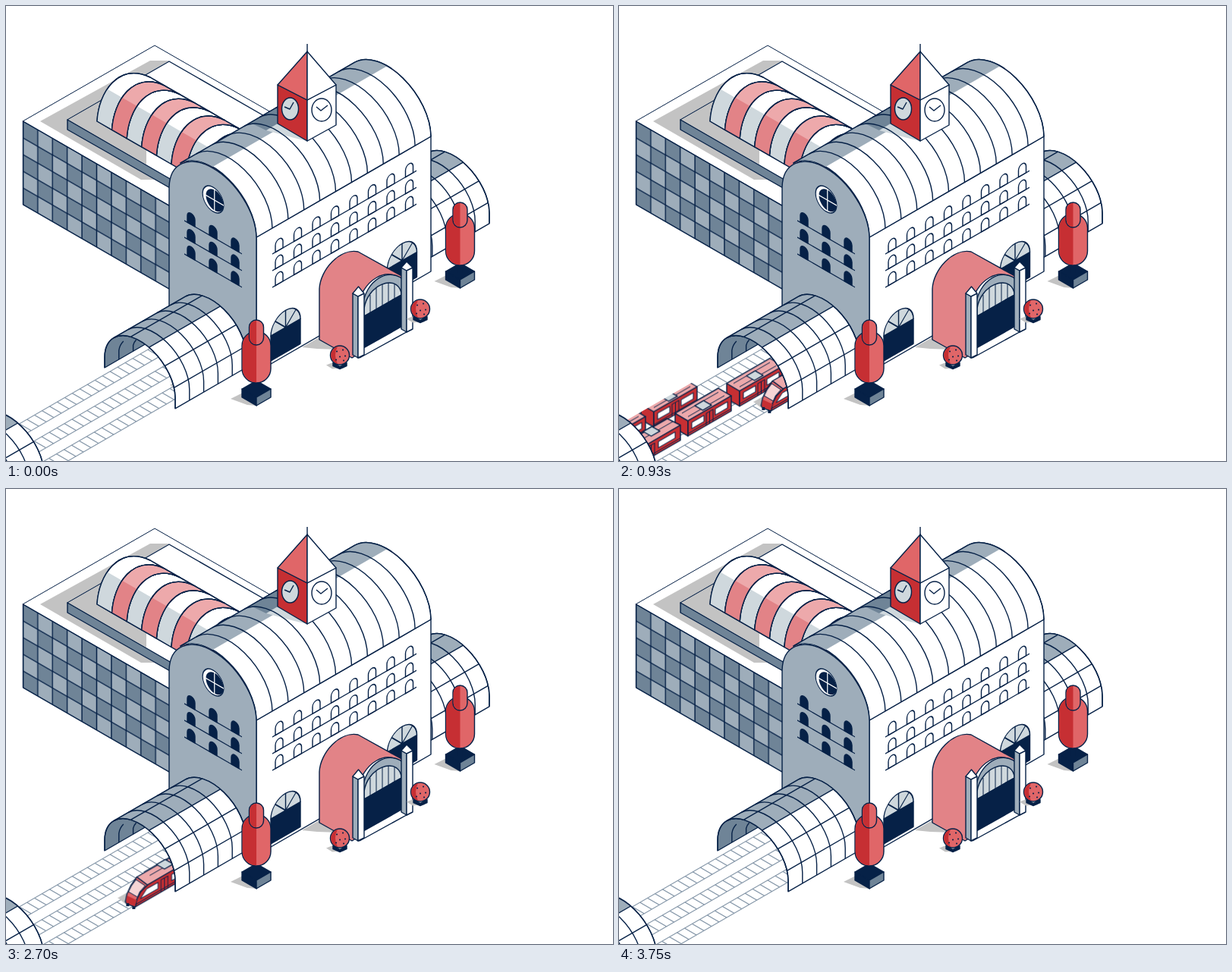
Animation, 800 px wide and 600 px high, one loop 4530 ms. Source, as an HTML page without scripts:

```html
<!DOCTYPE html>
<html lang="en">
<head>
<meta charset="utf-8">
<title>Railway station</title>
<style>
html, body { margin: 0; width: 100%; height: 100%; overflow: hidden; background: #fff; }
svg { display: block; width: 800px; height: 600px; stroke: #062147; stroke-width: 1.4; stroke-linejoin: round; fill: none; }
.flat { stroke: none; }
.white { fill: #fff; }
.ink { fill: #062147; }
.slate { fill: #6f8497; }
.steel { fill: #9eadba; }
.mist { fill: #cfd8dd; }
.shade { fill: #c3c3c3; stroke: none; }
.red { fill: #c62f33; }
.coral { fill: #e06668; }
.rose { fill: #e28387; }
.pink { fill: #eda9ab; }
.blush { fill: #f6d5d5; }
.thin { stroke-width: 1; }
.track { stroke: #8496a8; stroke-width: 1.3; }
.train { animation: 4530ms infinite; }
#express { animation-name: express; }
#local { animation-name: local; }
#shuttle { animation-name: shuttle; }

/* nose position along the track, one step per 30 ms */
@keyframes express {
  0% { transform: translateX(207px); animation-timing-function: steps(55); }
  36.424%, 100% { transform: translateX(-377px); }
}
@keyframes local {
  0% { transform: translateX(222px); animation-timing-function: steps(55); }
  36.424%, 100% { transform: translateX(-188px); }
}
@keyframes shuttle {
  0% { transform: translateX(226px); animation-timing-function: steps(16); }
  10.596% { transform: translateX(207px); animation-timing-function: steps(8); }
  15.894% { transform: translateX(198px); animation-timing-function: steps(15); }
  25.828% { transform: translateX(175px); animation-timing-function: steps(15); }
  35.762%, 58.94% { transform: translateX(166px); animation-timing-function: steps(9); }
  64.901% { transform: translateX(88px); animation-timing-function: steps(27); }
  82.781%, 100% { transform: translateX(-185px); }
}
</style>
</head>
<body>
<svg viewBox="0 0 800 600">
<defs>
  <pattern id="checks" width="38.8" height="44" patternUnits="userSpaceOnUse">
    <path class="steel flat" d="M0 0H38.8V44H0z"/>
    <path class="slate flat" d="M0 0H19.4V22H0zM19.4 22H38.8V44H19.4z"/>
    <path d="M0 0V44M19.4 0V44M38.8 0V44M0 0H38.8M0 22H38.8M0 44H38.8"/>
  </pattern>
  <clipPath id="yard"><path d="M0 552L130 477V430H223V600H0z"/></clipPath>

  <g id="stripe">
    <path d="M0 0C2-38 28-78 70-58l19.6 11.3C47.6-66.7 21.6-26.7 19.6 11.3z"/>
    <path class="flat" fill="currentColor" d="M0 0C.8-15.2 5.4-30.7 13.4-42.6l19.6 11.3C25-19.4 20.4-3.9 19.6 11.3z"/>
    <path fill="none" d="M0 0C2-38 28-78 70-58l19.6 11.3C47.6-66.7 21.6-26.7 19.6 11.3z"/>
  </g>

  <path id="rib" d="M229.8 207.2A77.7 44.4 55 0 1 330 305"/>
  <path id="hoop" d="M-34.5-52.4A62.8 35.9 55 0 1 46.5 26.8v14"/>
  <g id="tunnel">
    <path class="white" d="M-34.5-52.4L59.5-106.7A62.8 35.9 55 0 1 140.5-27.5V-13.5L46.5 40.8V26.8A62.8 35.9 55 0 0-34.5-52.4z"/>
    <path class="steel flat" d="M-34.5-52.4L59.5-106.7A62.8 35.9 55 0 1 106-94.2L12-39.9A62.8 35.9 55 0 0-34.5-52.4z"/>
    <path d="M44.9 13.3l94-54.3M32.9-15.3l94-54.3M12-39.9l94-54.3M-12-53.8l94-54.3M-34.5-52.4l94-54.3"/>
    <use href="#hoop"/>
    <use href="#hoop" x="18.8" y="-10.85"/>
    <use href="#hoop" x="37.6" y="-21.7"/>
    <use href="#hoop" x="56.4" y="-32.6"/>
    <use href="#hoop" x="75.2" y="-43.4"/>
    <use href="#hoop" x="94" y="-54.3"/>
  </g>

  <path id="pane" d="M0 0V-9a5 5.8 0 0 1 10 0V0z"/>
  <g id="panes2"><use href="#pane"/><use href="#pane" x="24.5"/></g>
  <g id="panes4"><use href="#panes2"/><use href="#panes2" x="49"/></g>
  <g id="sideRow"><path d="M0 0H190"/><use href="#panes4" x="4"/><use href="#panes4" x="102"/></g>
  <g id="gableRow"><path d="M0 0H76"/><g class="ink"><use href="#pane" x="4"/><use href="#pane" x="33"/><use href="#pane" x="62"/></g></g>

  <g id="door">
    <path class="ink" d="M0 0V-33H39V0z"/>
    <path class="mist" d="M0-33a19.5 22.5 0 0 1 39 0z"/>
    <path d="M19.5-33V-55.5M19.5-33L5.7-48.9M19.5-33L33.3-48.9"/>
  </g>

  <g id="tree">
    <path class="shade" d="M296 518L318 507 330 527 318 526z"/>
    <path class="ink" d="M311 505l19-11 19 11-19 11z"/>
    <path class="ink" d="M311 505v11l19 11v-11z"/>
    <path class="slate" d="M349 505v11l-19 11v-11z"/>
    <path d="M330 490v18" stroke-width="6"/>
    <rect class="coral" x="311" y="429" width="38" height="68" rx="19"/>
    <path class="red flat" d="M330 429.7a18.3 18.3 0 0 0-18.3 18.3v30a18.3 18.3 0 0 0 18.3 18.3z"/>
    <rect class="coral" x="320.5" y="414" width="19" height="33" rx="9.5"/>
    <path class="red flat" d="M330 414.7a8.8 8.8 0 0 0-8.8 8.8v14a8.8 8.8 0 0 0 8.8 8.8z"/>
  </g>

  <g id="bush">
    <path class="shade" d="M-18 13L-8 9 6 17-10 18z"/>
    <path class="ink" d="M-9 10L0 15 9 10V14L0 18-9 14z"/>
    <circle class="coral" r="12.5"/>
    <path class="red flat" d="M-3-11.4A11.8 11.8 0 0 0-3 11.4Q-9 0-3-11.4z"/>
    <path d="M-4-5h.1M4-7h.1M7 1h.1M0 2h.1M5 7h.1M-5 6h.1" stroke-width="2" stroke-linecap="round"/>
  </g>

  <g id="pantograph">
    <path d="M-8-30L40-57.7M0-25.5L48-53.2" class="thin"/>
    <path class="mist" d="M9-40l11.5-6.6 10.5 6-11.5 6.6z"/>
  </g>
  <g id="car">
    <path class="red" d="M0 0V-20L-17-30V-10z"/>
    <path class="pink" d="M0-20L-17-30 40-63 57-53z"/>
    <use href="#pantograph"/>
    <g transform="matrix(1 -.57735 0 1 0 0)">
      <path class="red" d="M0 0V-20H57V0z"/>
      <path class="white thin" d="M5-15H21V-7H5zM36-15H52V-7H36z"/>
      <path class="thin" d="M24 0V-16H33V0M28.5-16V0M0-3H57"/>
    </g>
  </g>
  <g id="train" transform="matrix(1 .57735 0 1 0 0)">
    <use href="#car" x="168" y="-82.5"/>
    <use href="#car" x="100" y="-43.2"/>
    <path class="shade" d="M-10-5L4-13 13 6 0 3z"/>
    <path class="pink" d="M29-22L15-32.5 73-66 90-57.5z"/>
    <use href="#pantograph" x="32" y="-9"/>
    <path class="red" d="M13 7L15-3 20-13 29-22 90-57.5V-37.5z"/>
    <path class="coral" d="M0 0L2-10 7-21 15-32.5 29-22 20-13 15-3 13 7 2 3z"/>
    <path class="blush thin" d="M4-13L8-21 14-29 26-21 19-13 16-6z"/>
    <path class="red flat" d="M1 0L2-8 15-2 12.5 6 2 2.5z"/>
    <path class="ink flat" d="M1 2h4v4h-4zM9 6h4v4h-4z"/>
    <g transform="matrix(1 -.57735 0 1 0 14.5)">
      <path class="white thin" d="M20-7L28-15H43V-7zM61-15H83V-7H61z"/>
      <path class="thin" d="M47 0V-16H56V0M51.5-16V0M14-3H90"/>
    </g>
  </g>
</defs>

<!-- rear hall -->
<path class="white thin" d="M22 152L196 52 370 152 215 263z"/>
<path class="shade" d="M45 152L190 72H215L81 150V163L215 240V229H178z"/>
<path class="white" d="M81 150L215 73 349 150 215 228z"/>
<path class="shade" d="M82 150L150 111 120 152 185 190V209z"/>
<path class="slate" d="M81 150L218 229V241L81 163z"/>
<g transform="translate(120 152)">
  <g class="white" color="#cfd8dd">
    <use href="#stripe"/><use href="#stripe" x="39.2" y="22.6"/>
    <use href="#stripe" x="78.4" y="45.2"/><use href="#stripe" x="117.6" y="67.8"/>
  </g>
  <g class="pink" color="#e28387">
    <use href="#stripe" x="19.6" y="11.3"/><use href="#stripe" x="58.8" y="33.9"/>
    <use href="#stripe" x="98" y="56.5"/><use href="#stripe" x="137.2" y="79.1"/>
  </g>
</g>
<path transform="matrix(1 .57735 0 1 22.5 152)" fill="url(#checks)" d="M0 0H194V110H0z"/>

<use href="#tunnel" x="496.5" y="300.3"/>

<!-- main hall -->
<path class="white" d="M330 305L560 172V350L330 483z"/>
<path class="white" d="M229.8 207.2L459.8 74.2A77.7 44.4 55 0 1 560 172L330 305A77.7 44.4 55 0 0 229.8 207.2z"/>
<path class="steel flat" d="M229.8 207.2L459.8 74.2Q477 64.3 502.5 79L272.5 212Q247 197.3 229.8 207.2z"/>
<path class="slate flat" d="M322 154L358 134V162L343 164z"/>
<path class="mist flat" d="M343 164L358 155 397 178 380 174z"/>
<path d="M229.8 207.2L459.8 74.2"/>
<use href="#rib" x="20.9" y="-12.1"/><use href="#rib" x="41.8" y="-24.2"/>
<use href="#rib" x="62.7" y="-36.3"/><use href="#rib" x="83.6" y="-48.4"/>
<use href="#rib" x="104.5" y="-60.5"/><use href="#rib" x="125.5" y="-72.5"/>
<use href="#rib" x="146.4" y="-84.6"/><use href="#rib" x="167.3" y="-96.7"/>
<use href="#rib" x="188.2" y="-108.8"/><use href="#rib" x="209.1" y="-120.9"/>
<use href="#rib" x="230" y="-133"/>

<path class="steel" d="M215 400V239A77.7 44.4 55 0 1 330 305V483z"/>
<g transform="matrix(.866 .5 0 1 273 255)">
  <circle class="white" r="16"/>
  <circle class="ink flat" cx="2.5" r="13.5"/>
  <path d="M-12 0H16M2-14V14" stroke="#fff"/>
</g>
<g transform="matrix(1 .57735 0 1 235 283)">
  <use href="#gableRow"/><use href="#gableRow" y="22"/><use href="#gableRow" y="44"/>
</g>
<g transform="matrix(1 -.57735 0 1 351 327)">
  <use href="#sideRow"/><use href="#sideRow" y="22"/><use href="#sideRow" y="44"/>
</g>
<use href="#door" transform="matrix(1 -.57735 0 1 349 468)"/>
<use href="#door" transform="matrix(1 -.57735 0 1 502.5 380)"/>

<!-- clock tower -->
<path class="red" d="M358 104L397 124V178L358 155z"/>
<path class="white" d="M435 104L397 124V178L435 157z"/>
<path class="coral" d="M397 60L358 104 397 124z"/>
<path class="white" d="M397 60L435 104 397 124z"/>
<path d="M397 50V60"/>
<ellipse class="mist" cx="374.5" cy="135.5" rx="11" ry="14.5"/>
<ellipse class="white" cx="416" cy="137" rx="13" ry="15"/>
<path d="M367 133L374 136 379 127M409 133L415 138 424 131"/>

<!-- entrance -->
<path class="shade" d="M390 450L413 437 456 462 440 453 410 452z"/>
<path class="rose" d="M413 440V373C414 348 440 319 464 324L525 358V420L456 464z"/>
<path class="white" d="M464 464V400C466 362 506 338 526 366V430z"/>
<path class="steel" d="M470 455V398C472 362 506 341 527 364V425L521 428V378C516 357 480 368 473 400z"/>
<path class="mist" d="M472 409V399C476 368 514 352 521 378V381z"/>
<path class="thin" d="M480 404V381M488 400V372M496 395V367M504 391V365M512 386V367"/>
<path class="ink" d="M472 409L521 381V424L472 451z"/>
<path class="white" d="M466 464V454L535 415V426z"/>
<path class="steel" d="M457 379L464 383V464L457 460z"/>
<path class="white" d="M464 383L472 379V460L464 464zM457 379L464.5 370 472 379 464 383z"/>
<path class="steel" d="M521 345L528 349V430L521 426z"/>
<path class="white" d="M528 349L536 345V426L528 430zM521 345L528 337 536 345 528 349z"/>

<!-- tracks and trains -->
<g class="track" transform="matrix(.866 -.5 .866 .5 130 477)">
  <path d="M-220 9H120M-220 27H120M-220 43H120M-220 61H120M-220 77H120M-220 95H120"/>
  <path d="M-220 18H120M-220 52H120M-220 86H120" stroke-width="18" stroke-dasharray="1.3 10.2"/>
</g>
<g transform="translate(176.5 490)">
  <path class="slate" d="M-46.5-13V-26.8A62.8 35.9 55 0 1 7-44z"/>
  <path d="M-27.7-23.9v-12q1-7 6-12M-8.9-34.7v-8q1-4 4-7"/>
  <path d="M-46.5-13V-26.8A62.8 35.9 55 0 1-34.5-52.4"/>
</g>
<g clip-path="url(#yard)">
  <g transform="matrix(1 -.57735 0 1 0 567)"><g class="train" id="express"><use href="#train"/></g></g>
  <g transform="matrix(1 -.57735 0 1 0 605)"><g class="train" id="local"><use href="#train"/></g></g>
  <g transform="matrix(1 -.57735 0 1 0 635)"><g class="train" id="shuttle"><use href="#train"/></g></g>
</g>
<use href="#tunnel" x="-90.5" y="644.2"/>
<use href="#tunnel" x="176.5" y="490"/>

<use href="#tree"/>
<use href="#tree" x="268.5" y="-155"/>
<use href="#bush" x="440" y="460.5"/>
<use href="#bush" x="546" y="399.5"/>
</svg>
</body>
</html>
```
